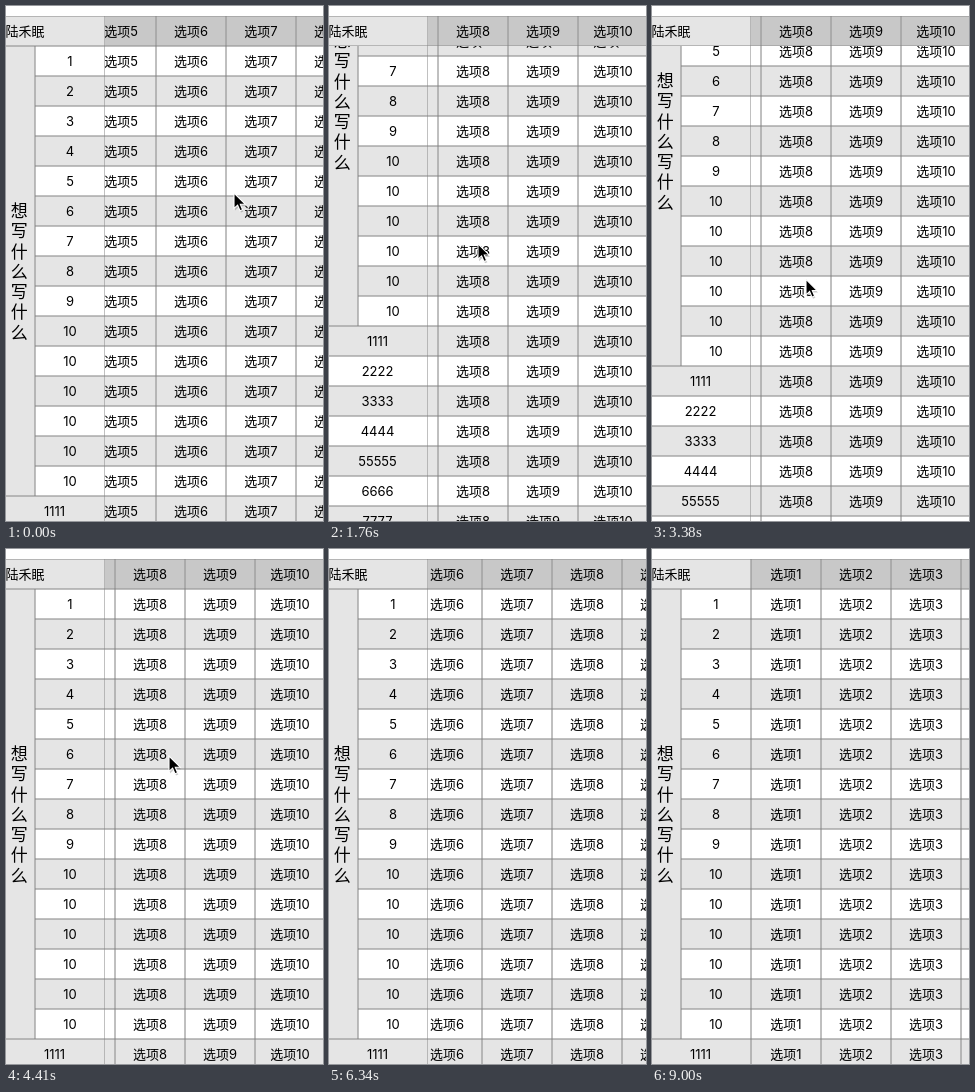
These frames come from a looping animation (317 px wide and 515 px high, 9.49 s). An HTML page:

```html
<!DOCTYPE html>
<html lang="zh-CN">
<head>
<meta charset="utf-8">
<title>表格滚动</title>
<style>
  html, body { margin: 0; width: 100%; height: 100%; overflow: hidden; background: #fff; }
  svg { display: block; }
  text { font: 13px Inter, 'Noto Sans CJK SC', 'Noto Sans CJK', sans-serif; text-anchor: middle; fill: #000; }
  .tall { font-size: 17px; }
  rect { stroke: #808080; stroke-width: .5; }
</style>
</head>
<body>
<svg id="stage" width="100%" height="100%" viewBox="0 0 317 515">
  <svg x="99" y="40" width="218" height="475"><g id="cells"></g></svg>
  <svg x="0" y="40" width="99" height="475"><g id="labels"></g></svg>
  <svg x="99" y="10" width="218" height="30"><g id="heads"></g></svg>
  <svg x="0" y="10" width="99" height="30"><g id="corner"></g></svg>
  <g id="cursor">
    <path d="M1 2V17.5L4.6 14.2L7 19.5L9.4 18.4L7.1 13.2H12Z" fill="#000" opacity=".2"/>
    <path d="M0 0V15.5L3.6 12.2L6 17.8L8.6 16.7L6.3 11.2H11.2Z" fill="#000" stroke="#fff" stroke-width="1.1"/>
  </g>
</svg>
<script>
const LOOP = 9490, STEP = 147.5, LAST_STEP = 61;
const ROW = 30, COL = 70, COLUMNS = 10, GROUP_ROWS = 15;
const WHITE = '#fff', LIGHT = '#e5e5e5', DARK = '#c8c8c8';
const $ = id => document.getElementById(id);

function add(parent, tag, attrs, text) {
  const node = document.createElementNS('http://www.w3.org/2000/svg', tag);
  for (const key in attrs) node.setAttribute(key, attrs[key]);
  if (text) node.textContent = text;
  parent.append(node);
}

function box(parent, x, y, width, height, fill) {
  add(parent, 'rect', { x: x + .25, y: y + .25, width: width - .5, height: height - .5, fill });
}

function cell(parent, x, y, width, fill, text, textX = x + width / 2) {
  box(parent, x, y, width, ROW, fill);
  add(parent, 'text', { x: textX, y: y + 19.7 }, text);
}

function build() {
  const names = Array.from({ length: GROUP_ROWS }, (_, i) => String(Math.min(i + 1, 10)));
  names.push('1111', '2222', '3333', '4444', '55555', '6666', '7777', '8888', '88888888', '8888');

  box($('labels'), -2, 0, 31, GROUP_ROWS * ROW, LIGHT);
  [...'想写什么写什么'].forEach((char, i) =>
    add($('labels'), 'text', { x: 13.3, y: 171 + i * 20.25, class: 'tall' }, char));

  names.forEach((name, row) => {
    const fill = row % 2 ? LIGHT : WHITE, left = row < GROUP_ROWS ? 29 : -2;
    cell($('labels'), left, row * ROW, 99 - left, fill, name);
    for (let c = 0; c < COLUMNS; c++)
      cell($('cells'), c * COL, row * ROW, COL, fill, '选项' + (c + 1));
  });
  for (let c = 0; c < COLUMNS; c++) cell($('heads'), c * COL, 0, COL, DARK, '选项' + (c + 1));
  cell($('corner'), -2, 0, 101, LIGHT, '陆禾眠', 19);
}

// Keys are [step, value...].
const scrollX = [[0, 299], [1, 312], [2, 345], [3, 385], [4, 415], [5, 437], [6, 452], [8, 469],
  [9, 477], [10, 480], [37, 480], [40, 462], [42, 405], [43, 366], [44, 200], [45, 55],
  [46, -10], [47, -4], [50, 0]];
const scrollY = [[9, 0], [10, 35], [11, 100], [12, 170], [13, 225], [14, 257], [15, 269], [17, 269],
  [19, 235], [21, 160], [23, 130], [25, 130], [27, 70], [29, 12], [30, 0], [32, 0], [34, 80],
  [36, 140], [38, 110], [40, 25], [41, 0], [51, 0], [52, 45], [53, 112], [54, 180], [55, 235],
  [56, 262], [57, 269], [58, 225], [59, 130], [60, 35], [61, 0]];
const pointer = [[0, 228, 187], [4, 160, 195], [8, 149, 336], [9, 149, 336], [13, 149, 205],
  [17, 148, 195], [22, 152, 300], [25, 158, 220], [28, 160, 280], [30, 163, 207], [32, 163, 240],
  [35, 160, 140], [39, 150, 240], [51, 180, 238], [53, 180, 126], [56, 180, 90], [59, 180, 250]];

function valueAt(keys, step, field = 1) {
  const next = keys.findIndex(key => key[0] > step);
  if (next === 0) return keys[0][field];
  if (next < 0) return keys[keys.length - 1][field];
  const a = keys[next - 1], b = keys[next];
  return a[field] + (b[field] - a[field]) * (step - a[0]) / (b[0] - a[0]);
}

function move(id, x, y) {
  $(id).setAttribute('transform', `translate(${x} ${y})`);
}

function render(time) {
  const step = Math.min(LAST_STEP, Math.floor((time % LOOP + 16) / STEP));
  const x = -Math.round(valueAt(scrollX, step)), y = -Math.round(valueAt(scrollY, step));
  move('cells', x, y);
  move('heads', x, 0);
  move('labels', 0, y);
  move('cursor', valueAt(pointer, step, 1), valueAt(pointer, step, 2));
  const hidden = step > 39 && step < 52 || step > 59;
  $('cursor').setAttribute('visibility', hidden ? 'hidden' : 'visible');
}

build();
const start = performance.now();
function tick() {
  render(performance.now() - start);
  requestAnimationFrame(tick);
}
tick();
</script>
</body>
</html>
```
